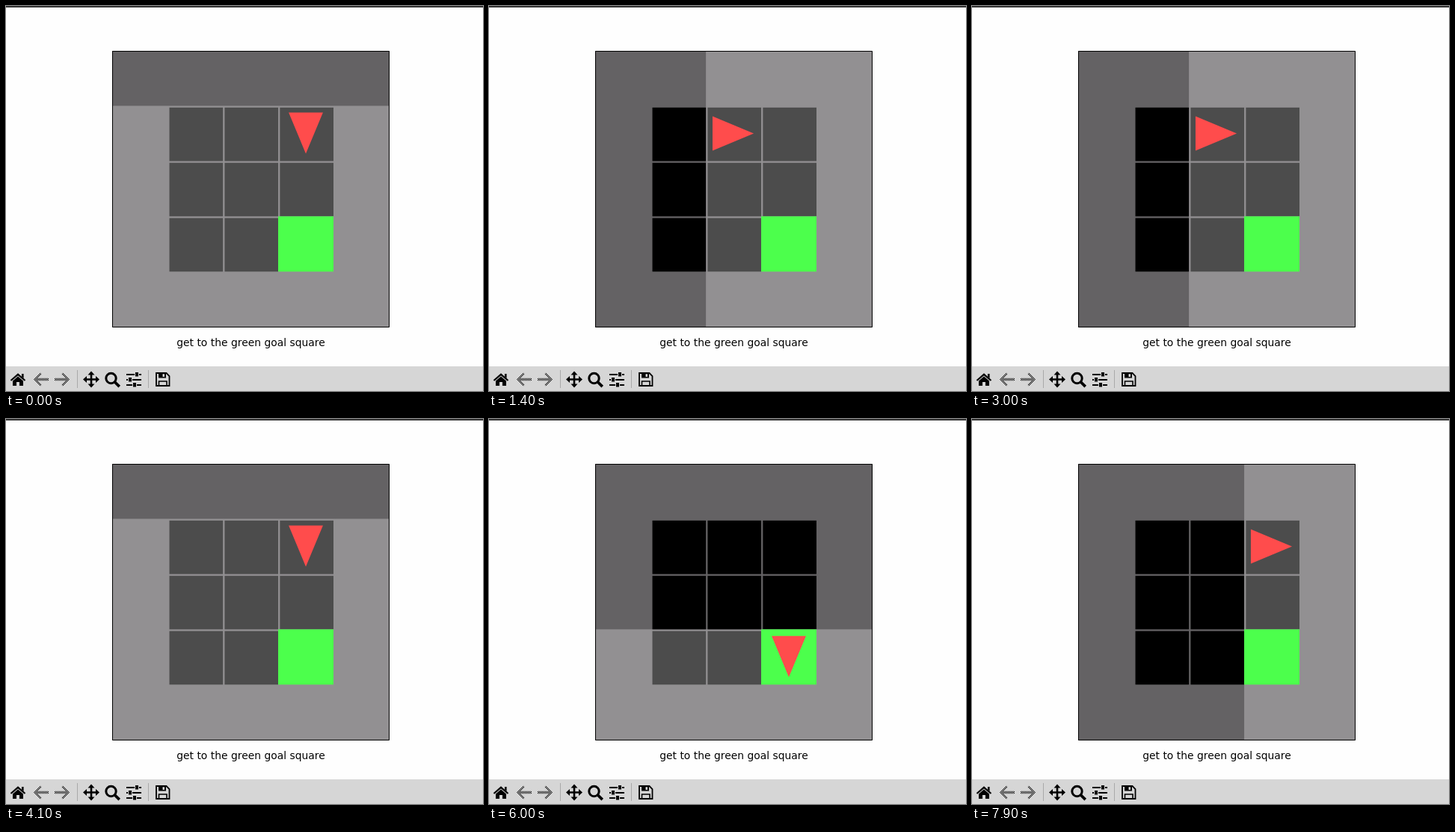
These frames come from a looping animation (638 px wide and 515 px high, 8000 ms). An HTML page with a canvas:

```html
<!DOCTYPE html>
<html lang="en">
<head>
<meta charset="utf-8">
<style>
html, body { margin: 0; width: 638px; height: 515px; overflow: hidden; background: #fefefe; }
canvas { display: block; }
</style>
</head>
<body>
<canvas width="638" height="515"></canvas>
<script>
const ctx = document.querySelector('canvas').getContext('2d');
const CELL = 73.92, LEFT = 142.3, TOP = 59.6, LINE = CELL / 32;

// The six poses of one walk to the goal: column, row, facing down
const POSES = [[1, 1, 0], [2, 1, 0], [3, 1, 0], [3, 1, 1], [3, 2, 1], [3, 3, 1]];
// Pose shown in each 100 ms slot
const TIMELINE =
  '34501233450000123350' + '12345000001122335012' +
  '23450123333000012234' + '50123335012344400112';

const checker = document.createElement('canvas');
checker.width = checker.height = 2;
const dots = checker.getContext('2d');
dots.fillRect(0, 0, 1, 1);
dots.fillRect(1, 1, 1, 1);
const stipple = ctx.createPattern(checker, 'repeat');

function box(x, y, w, h, color) {
  ctx.fillStyle = color;
  ctx.fillRect(x, y, w, h);
}

function fill(path, color = '#000') {
  ctx.fillStyle = color;
  ctx.fill(new Path2D(path), 'evenodd');
}

function stroke(path, width, color = '#000') {
  ctx.lineWidth = width;
  ctx.strokeStyle = color;
  ctx.stroke(new Path2D(path));
}

function drawToolbar() {
  box(0, 482, 638, 33, '#d6d6d6');
  stroke('M95.5 487V511M190.5 487V511', 1, '#a9a9a9');

  // Home
  stroke('M6.5 501L16 492.8L25.5 501', 2.2);
  fill('M9 501.5L16 495.5L23 501.5V508H18V503H14V508H9ZM21 492H23.6V498L21 495.6Z');

  // Back and forward, disabled
  const arrow = 'L10 2.5L4.5 7.8H19V11.2H4.5L10 16.5L8 18.5L-1 9.5Z';
  ctx.save();
  ctx.translate(38, 490);
  fill('M8 .5' + arrow, stipple);
  ctx.translate(46, 0);
  ctx.scale(-1, 1);
  fill('M8 .5' + arrow, stipple);
  ctx.restore();

  // Pan
  stroke('M114 492V507M106 499.5H122', 2.6);
  for (let i = 0; i < 4; i++) {
    ctx.save();
    ctx.translate(114, 499.5);
    ctx.rotate(i * Math.PI / 2);
    fill('M0 -11L4.5 -6H-4.5Z');
    ctx.restore();
  }

  // Zoom
  stroke('M147.2 498a6.7 6.7 0 1 1 -13.4 0a6.7 6.7 0 1 1 13.4 0', 3);
  stroke('M145 502.5L151.7 509.2', 3.8);

  // Sliders
  for (const [y, knob] of [[493, 173], [500, 164], [507, 170]]) {
    box(161, y - 1, 20, 2, '#000');
    box(knob - 1, y - 2, 6, 4, '#d6d6d6');
    box(knob, y - 3, 4, 5.5, '#000');
  }

  // Save
  stroke('M201 491H214.5L218.5 495V508H201Z', 1.8);
  stroke('M204.5 508V502H215V508', 1.6);
  fill('M204 491H214V497.5H204ZM209.5 492.2V496H212V492.2Z');
}

function drawGrid([col, row, down]) {
  const lit = (c, r) => down ? r >= row : c >= col;
  const edge = k => LEFT + k * CELL;
  const side = k => TOP + k * CELL;

  ctx.save();
  ctx.beginPath();
  ctx.rect(142, 60, 371, 370);
  ctx.clip();
  box(142, 59, 371, 371, '#646264');
  if (down) box(142, side(row), 371, 371, '#929092');
  else box(edge(col), 59, 371, 371, '#929092');

  for (let r = 1; r < 4; r++) {
    for (let c = 1; c < 4; c++) {
      if (r + c < 6) {
        box(edge(c) + LINE, side(r) + LINE, CELL - LINE, CELL - LINE,
          lit(c, r) ? '#4c4c4c' : '#000');
      }
    }
  }
  box(edge(3), side(3), CELL, CELL, '#4cff4c');

  ctx.translate(edge(col + .5), side(row + .5));
  ctx.rotate(down * Math.PI / 2);
  ctx.scale(CELL, CELL);
  fill('M-.38 -.31L.365 0L-.38 .31Z', '#ff4c4c');
  ctx.restore();

  stroke('M142.5 60.5H512.5V429.5H142.5Z', 1);
}

function draw(now) {
  const slot = Math.floor(now % 8000 / 100);
  box(0, 0, 638, 515, '#fefefe');
  box(0, 0, 638, 2, '#353535');
  drawGrid(POSES[TIMELINE[slot]]);
  ctx.fillStyle = '#000';
  ctx.font = '13.89px "DejaVu Sans", sans-serif';
  ctx.textAlign = 'center';
  ctx.fillText('get to the green goal square', 327.5, 455);
  drawToolbar();
}

const start = performance.now();
function tick() {
  draw(performance.now() - start);
  requestAnimationFrame(tick);
}
tick();
</script>
</body>
</html>
```
